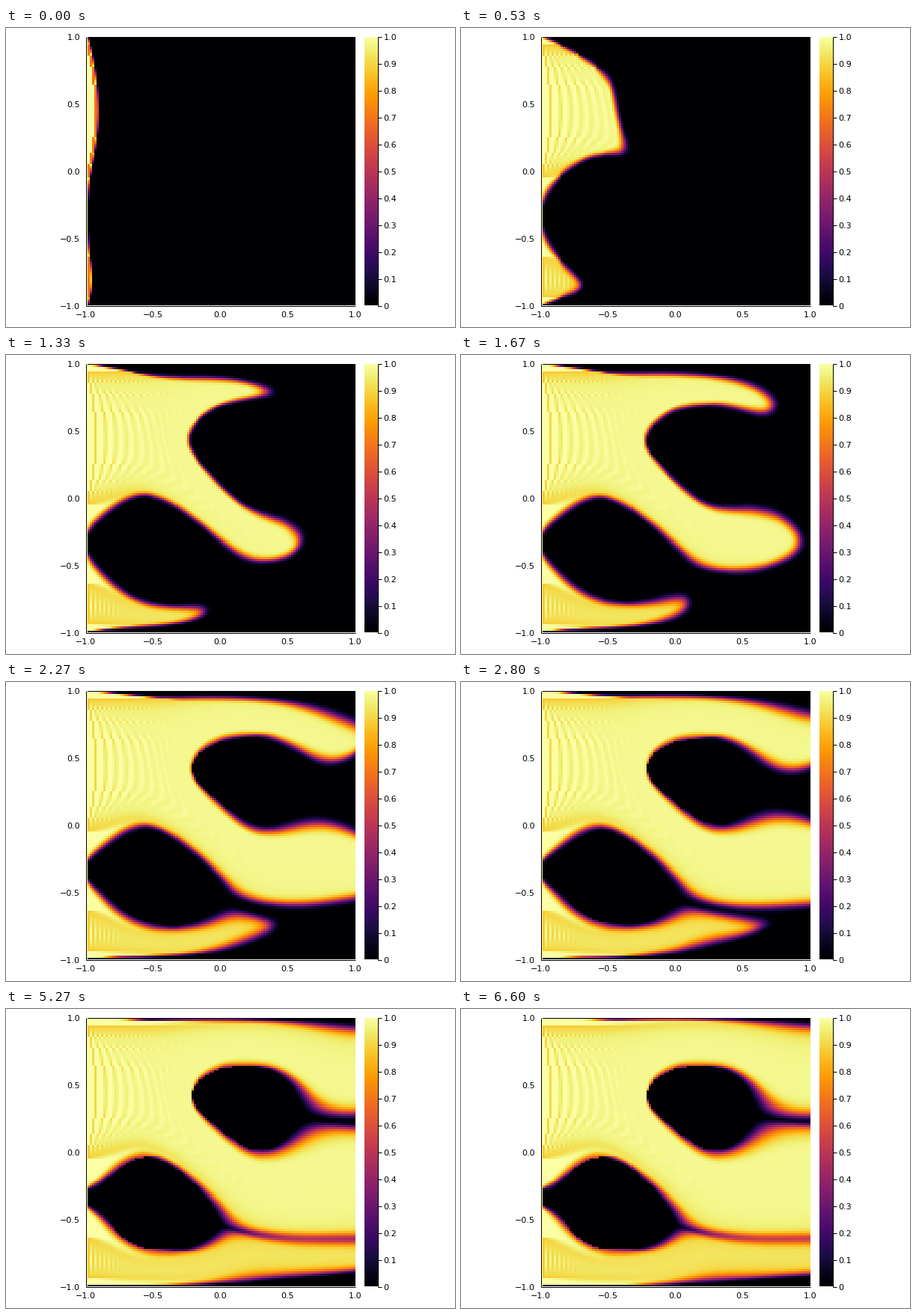
Animation of 600 by 400 pixels, one loop 6.67 s. Source, as a matplotlib script:

```python
import numpy as np
import matplotlib.pyplot as plt
from matplotlib.animation import FuncAnimation

FRAMES, LOOP_MS = 100, 6670
N = 120                # nodes per side of the tracer grid
M = 52                 # intervals per side of the flow grid
H = 2 / (N - 1)
PEAK = 4.6             # fastest inlet speed, cells per frame

BODIES = [
    [(-.865, -.39), (-.835, -.24), (-.76, -.135), (-.66, -.065), (-.56, -.04),
     (-.46, -.06), (-.38, -.1), (-.26, -.2), (-.12, -.335), (-.01, -.48),
     (-.005, -.555), (-.09, -.64), (-.23, -.7), (-.42, -.72), (-.645, -.685),
     (-.785, -.58)],
    [(-.225, .42), (-.17, .52), (-.065, .59), (.075, .63), (.24, .63),
     (.405, .585), (.52, .5), (.575, .37), (.56, .23), (.475, .1),
     (.35, .02), (.225, .015), (.1, .09), (-.035, .205), (-.165, .31)],
]


def body_ratio(x, y):
    """Distance from the nearest body's centre, relative to its outline."""
    best = np.full(x.shape, 9.0)
    for pts in BODIES:
        p = np.array(pts)
        cx, cy = p.mean(0)
        angle = np.arctan2(p[:, 1] - cy, p[:, 0] - cx)
        radius = np.hypot(p[:, 0] - cx, p[:, 1] - cy)
        edge = np.interp(np.arctan2(y - cy, x - cx), angle, radius,
                         period=2 * np.pi)
        best = np.minimum(best, np.hypot(x - cx, y - cy) / edge)
    return best


def bilinear(f, col, row):
    col = np.clip(col, 0, f.shape[1] - 1)
    row = np.clip(row, 0, f.shape[0] - 1)
    i = np.minimum(col.astype(int), f.shape[1] - 2)
    j = np.minimum(row.astype(int), f.shape[0] - 2)
    a, b = col - i, row - j
    return ((1 - b) * ((1 - a) * f[j, i] + a * f[j, i + 1])
            + b * ((1 - a) * f[j + 1, i] + a * f[j + 1, i + 1]))


def creeping_flow():
    """Slow viscous channel flow past the bodies, on the coarse grid."""
    n, h = M + 1, 2 / M
    d2 = (np.eye(n, k=1) - 2 * np.eye(n) + np.eye(n, k=-1)) / h**2
    d2[0, 1] = d2[-1, -2] = 2 / h**2
    eye, d4 = np.eye(n), d2 @ d2
    A = np.kron(eye, d4)
    A += np.kron(d4, eye)
    A += np.kron(2 * d2, d2)

    # strong drag inside the bodies
    s = np.linspace(-1, 1, n)
    x, y = np.meshgrid(s, s)
    drag = 2e4 * np.clip((1 - body_ratio(x, y)) / .1 + .5, 0, 1)
    idx = np.arange(n * n).reshape(n, n)
    for p, q in ((np.s_[:, :-1], np.s_[:, 1:]), (np.s_[:-1], np.s_[1:])):
        i, j = idx[p].ravel(), idx[q].ravel()
        w = ((drag[p] + drag[q]) / 2 / h**2).ravel()
        A[i, i] += w
        A[j, j] += w
        A[i, j] -= w
        A[j, i] -= w

    inner = slice(n, n * n - n)
    psi = np.zeros((n, n))
    psi[-1] = 1
    rhs = -A[inner, n * n - n:].sum(1)
    psi[1:-1] = np.linalg.solve(A[inner, inner], rhs).reshape(n - 2, n)

    u = np.gradient(psi, h, axis=0)
    v = -np.gradient(psi, h, axis=1)
    u[[0, -1]] = 0
    v[[0, -1]] = 0
    v[:, [0, -1]] = 0
    return u, v


def simulate():
    s = np.linspace(-1, 1, N)
    x, y = np.meshgrid(s, s)
    row, col = np.mgrid[0:N, 0:N].astype(float)
    u, v = (bilinear(f, col * M / (N - 1), row * M / (N - 1))
            for f in creeping_flow())
    scale = PEAK / u[:, 0].max()
    fluid = body_ratio(x, y) >= 1
    u, v = u * scale * fluid, v * scale * fluid

    # departure points by the midpoint rule
    mid = col - u / 2, row - v / 2
    from_col = col - bilinear(u, *mid) * fluid
    from_row = row - bilinear(v, *mid) * fluid
    outside = from_col < -1
    rim = (from_col < 0) & ~outside

    c = np.zeros((N, N))
    c[:, 0] = 1
    history = []
    for _ in range(FRAMES):
        near = bilinear(c, np.ones_like(col), from_row)
        c = bilinear(c, from_col, from_row)
        c[rim] = .7 + .2 * near[rim]
        c[outside] = 1
        c[:, 0] = 1
        history.append(c)
    return history


history = simulate()

fig = plt.figure(figsize=(6, 4), dpi=100, facecolor="white")


def pixel_axes(left, top, width, height):
    ax = fig.add_axes([left / 600, 1 - (top + height) / 400,
                       width / 600, height / 400])
    ax.axis("off")
    return ax


heat = pixel_axes(106.5, 11.5, 360, 360)
edge = 1 + H / 2
image = heat.imshow(history[0], cmap="inferno", vmin=0, vmax=1,
                    origin="lower", interpolation="nearest", aspect="auto",
                    extent=(-edge, edge, -edge, edge))
heat.set(xlim=(-1, 1), ylim=(-1, 1))

bar = pixel_axes(478.5, 11.5, 18, 360)
bar.imshow(np.linspace(0, 1, 256)[:, None], cmap="inferno", origin="lower",
           aspect="auto", interpolation="nearest")

page = pixel_axes(0, 0, 600, 400)
page.set(xlim=(0, 600), ylim=(400, 0))


def line(xs, ys):
    page.plot(xs, ys, color="black", lw=.72, solid_capstyle="butt")


def label(x, y, text, ha):
    page.text(x, y, text, ha=ha, va="baseline", fontsize=8,
              family="DejaVu Sans", color="black")


line([106.5, 106.5], [11.5, 371.5])
line([106.5, 466.5], [371.5, 371.5])
line([496.5, 496.5], [11.5, 371.5])
for k in range(5):
    text = f"{-1 + k / 2:.1f}".replace("-", "\u2212")
    label(106.5 + 90 * k, 387, text, "center")
    label(99, 375.8 - 90 * k, text, "right")
for k in range(11):
    y = 371.5 - 36 * k
    line([496.5, 501.5], [y, y])
    label(504.5, y + 4.3, f"{k / 10:.1f}" if k else "0", "left")


def update(k):
    image.set_data(history[k])
    return [image]


anim = FuncAnimation(fig, update, frames=FRAMES, interval=LOOP_MS / FRAMES,
                     repeat=True, repeat_delay=0, blit=False)
plt.show()
```
